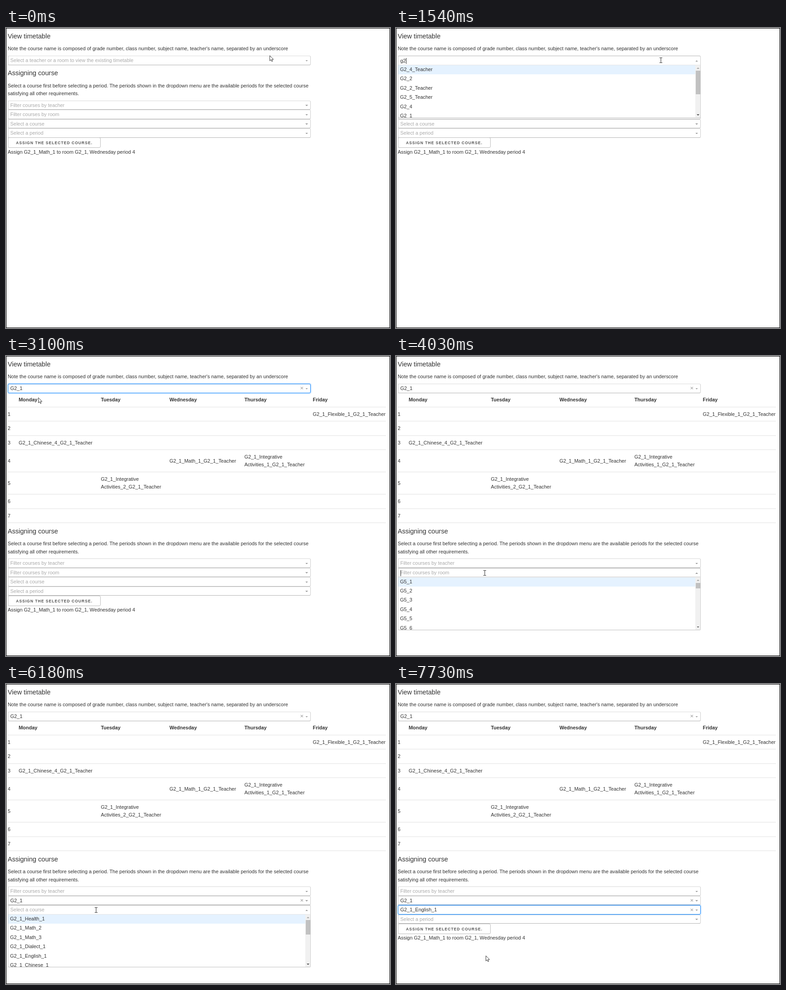
These frames come from a looping animation (848 by 661 pixels, 8000 ms). An HTML page:

```html
<!DOCTYPE html>
<html lang="en">
<head>
<meta charset="utf-8">
<title>Timetable</title>
<style>
  html, body { margin: 0; width: 100%; height: 100%; overflow: hidden; background: #fff; }
  #stage { position: absolute; left: 0; top: 0; width: 848px; height: 661px; overflow: hidden;
    color: #323232; font: 10.95px/14px "Liberation Sans", Arial, sans-serif; white-space: pre; }
  #stage div, #stage svg, #stage i { position: absolute; box-sizing: border-box; }
  .frame { inset: 0; border: 1px solid #000; }
  .head { font-size: 14.6px; line-height: 18px; }
  .bold { font-weight: 700; }
  .rule { left: 4px; width: 835px; height: 1px; background: #e1e1e1; }
  .button { left: 4px; width: 205px; height: 22.9px; border: 1px solid #bbb; border-radius: 3px; }
  .caps { font-size: 8.5px; font-weight: 700; letter-spacing: 1.05px; color: #555; }
  .select { left: 4px; width: 669px; height: 20.45px; }
  .control { inset: 0; border: 1px solid; border-color: #d9d9d9 #ccc #b3b3b3; border-radius: 3px; background: #fff; }
  .open .control { border-color: #b3b3b3 #ccc #d9d9d9; border-radius: 3px 3px 0 0; }
  .focus { z-index: 1; }
  .focus .control { border-color: #007eff; box-shadow: inset 0 1px 1px rgba(0,0,0,.075), 0 0 0 2.2px rgba(0,126,255,.1); }
  .open { z-index: 2; }
  .hint { color: #aaa; }
  .clear { left: 643.4px; top: 2.2px; width: 12px; font-size: 13.14px; line-height: 16px; text-align: center; color: #999; }
  .tri { clip-path: polygon(0 0, 100% 0, 50% 100%); background: #999; }
  .up { clip-path: polygon(0 100%, 100% 100%, 50% 0); }
  .caret { width: 1px; height: 13px; top: 4.7px; background: #222; }
  .menu { left: 0; top: 19.7px; width: 669px; max-height: 117.4px; overflow: hidden; background: #fff;
    border: 1px solid #ccc; border-top-color: #e6e6e6; border-radius: 0 0 3px 3px; box-shadow: 0 1px 0 rgba(0,0,0,.06); }
  .menu p { margin: 0; height: 20.44px; padding-left: 4px; line-height: 18.6px; }
  .menu .hit { background: #e5f2ff; }
  .bar { right: 0; top: 0; width: 11px; height: 115.4px; background: #f1f1f1; }
  .thumb { left: 1px; width: 10px; top: 12px; background: #c1c1c1; }
</style>
</head>
<body>
<div id="stage"></div>
<script>
const LOOP = 8000, SHIFT = 286.5, ROW = 20.45;

const HINTS = ['Select a teacher or a room to view the existing timetable', 'Filter courses by teacher',
  'Filter courses by room', 'Select a course', 'Select a period'];

const G2 = ['G2_4_Teacher', 'G2_2', 'G2_2_Teacher', 'G2_5_Teacher', 'G2_4', 'G2_1'];
const run = (name, n) => Array.from({ length: n }, (_, i) => name + (i + 1));

const closed = { open: -1, typed: '', focus: -1, caret: 0, hit: 0, bare: -1 };

// Each step changes only the listed parts of the state before it.
const STEPS = [
  [0, { ...closed, cur: ['arrow', 582, 60], table: 0, vals: {} }],
  [310, { cur: ['arrow', 584, 68] }],
  [620, { open: 0, caret: 1, cur: ['beam', 585, 71], total: 80,
    list: ['G3_3', 'English_2', 'G1_4_Teacher', 'G5_2_Teacher', 'Health_1', 'G4_1'] }],
  [930, { typed: 'g', list: ['G3_3', 'G1_4_Teacher', 'G5_2_Teacher', 'G4_1', 'G6_3', 'G2_4_Teacher'] }],
  [1540, { typed: 'g2', list: G2, total: 10 }],
  [2160, { typed: 'g2_' }],
  [2780, { typed: 'g2_1', list: ['G2_1', 'G2_1_Teacher'], total: 2, cur: ['arrow', 71, 91] }],
  [3100, { ...closed, table: 1, vals: { 0: 'G2_1' }, focus: 0 }],
  [3710, { cur: ['arrow', 194, 476] }],
  [4030, { ...closed, open: 2, caret: 1, list: run('G5_', 6), total: 42, cur: ['beam', 196, 478] }],
  [4330, { typed: 'g2', list: run('G2_', 5), total: 5 }],
  [4640, { caret: 0, cur: ['arrow', 196, 503] }],
  [4950, { ...closed, vals: { 0: 'G2_1', 2: 'G2_1' }, focus: 2, bare: 2 }],
  [5260, { bare: -1, cur: ['arrow', 199, 497] }],
  [5880, { ...closed, open: 3, caret: 1, total: 16, cur: ['beam', 199, 498],
    list: ['Health_1', 'Math_2', 'Math_3', 'Dialect_1', 'English_1', 'Chinese_1'].map(s => 'G2_1_' + s) }],
  [6180, { caret: 0 }],
  [6800, { hit: 4, cur: ['arrow', 198, 599] }],
  [7120, { caret: 1 }],
  [7730, { ...closed, vals: { 0: 'G2_1', 2: 'G2_1', 3: 'G2_1_English_1' }, focus: 3, cur: ['arrow', 198, 598] }]
];

let last = {};
const states = STEPS.map(([t, change]) => last = { ...last, ...change, t });

const ASCENT = { head: 14, caps: 10 };
const text = (x, base, str, cls = '') =>
  `<div class="${cls}" style="left:${x}px;top:${base - (ASCENT[cls] || 11)}px">${str}</div>`;
const tri = (x, y, w, h, up, color = '#999') =>
  `<i class="tri ${up ? 'up' : ''}" style="left:${x}px;top:${y}px;width:${w}px;height:${h}px;background:${color}"></i>`;

function menu(s) {
  const rows = s.list.map((r, i) => `<p class="${i === s.hit ? 'hit' : ''}">${r}</p>`).join('');
  const thumb = Math.max(12, 92 * 115.4 / (s.total * 20.44));
  const bar = s.total < 6 ? '' : `<div class="bar">${tri(3, 5, 6, 3, true, '#a3a3a3')}` +
    `<div class="thumb" style="height:${thumb}px"></div>${tri(3, 108, 6, 3, false, '#505050')}</div>`;
  return `<div class="menu">${rows}${bar}</div>`;
}

function select(i, top, s) {
  const open = s.open === i, val = open ? '' : s.vals[i];
  const typed = open ? s.typed : '';
  const label = typed ? text(5.5, 15, typed) : text(5.5, 14, val || HINTS[i], val ? '' : 'hint');
  const caretX = 5.5 + typed.length * 6.09;
  return `<div class="select ${open ? 'open' : ''} ${s.focus === i ? 'focus' : ''}" style="top:${top}px">` +
    `<div class="control"></div>${label}` +
    (val && s.bare !== i ? '<div class="clear">×</div>' : '') +
    tri(657, open ? 10 : 9.4, 6, 3, open) +
    (open && s.caret ? `<div class="caret" style="left:${caretX}px"></div>` : '') +
    (open ? menu(s) : '') + '</div>';
}

function timetable() {
  const cols = [28, 209.4, 360.9, 526.4, 677.6];
  const days = ['Monday', 'Tuesday', 'Wednesday', 'Thursday', 'Friday'];
  const lines = [112, 143, 175, 206, 255, 304, 336, 367];
  const cells = [[4, 0, 'Flexible_1'], [0, 2, 'Chinese_4'], [2, 3, 'Math_1'],
    [3, 3, 'Integrative\nActivities_1'], [1, 4, 'Integrative\nActivities_2']];
  const mid = r => (lines[r] + lines[r + 1]) / 2 + 4;
  return days.map((d, i) => text(cols[i], 100.4, d, 'bold')).join('') +
    lines.map(y => `<div class="rule" style="top:${y}px"></div>`).join('') +
    lines.slice(1).map((_, r) => text(3.7, mid(r), r + 1)).join('') +
    cells.map(([c, r, name]) => `G2_1_${name}_G2_1_Teacher`.split('\n')
      .map((part, k, all) => text(cols[c], mid(r) + (k - (all.length - 1) / 2) * 17.5, part)).join('')).join('');
}

function cursor([kind, x, y]) {
  const box = `<svg style="left:${kind === 'beam' ? x - 4 : x}px;top:${kind === 'beam' ? y - 6 : y}px;z-index:3" width="12" height="16" fill="none">`;
  return box + (kind === 'beam'
    ? '<path d="M1 .5H3.5L4 1 4.5 .5H7M4 1V11M1 11.5H3.5L4 11 4.5 11.5H7" stroke="#222"/>'
    : '<path d="M.5 .8V12.2L3.2 9.8 5 13.8 6.8 13 5.1 9.2H8.6Z" fill="#fff" stroke="#222" stroke-width=".9"/>') + '</svg>';
}

function view(s) {
  const up = s.table ? 0 : SHIFT;
  return text(3.7, 23, 'View timetable', 'head') +
    text(3.7, 49, "Note the course name is composed of grade number, class number, subject name, teacher's name, separated by an underscore") +
    (s.table ? timetable() : '') +
    select(0, 61.2, s) +
    text(3.7, 390.9 - up, 'Assigning course', 'head') +
    text(3.7, 417.1 - up, 'Select a course first before selecting a period. The periods shown in the dropdown menu are the available periods for the selected course') +
    text(3.7, 434.6 - up, 'satisfying all other requirements.') +
    [1, 2, 3, 4].map(i => select(i, 446.45 + (i - 1) * ROW - up, s)).join('') +
    `<div class="button" style="top:${527.9 - up}px"></div>` +
    text(22, 542.6 - up, 'ASSIGN THE SELECTED COURSE.', 'caps') +
    text(3.7, 563.2 - up, 'Assign G2_1_Math_1 to room G2_1, Wednesday period 4') +
    cursor(s.cur) + '<div class="frame"></div>';
}

const stage = document.getElementById('stage');
const start = performance.now();
let shown = null;

function tick() {
  const t = (performance.now() - start) % LOOP;
  const s = states.filter(v => v.t <= t).pop();
  if (s !== shown) stage.innerHTML = view(shown = s);
  requestAnimationFrame(tick);
}
tick();
</script>
</body>
</html>
```
